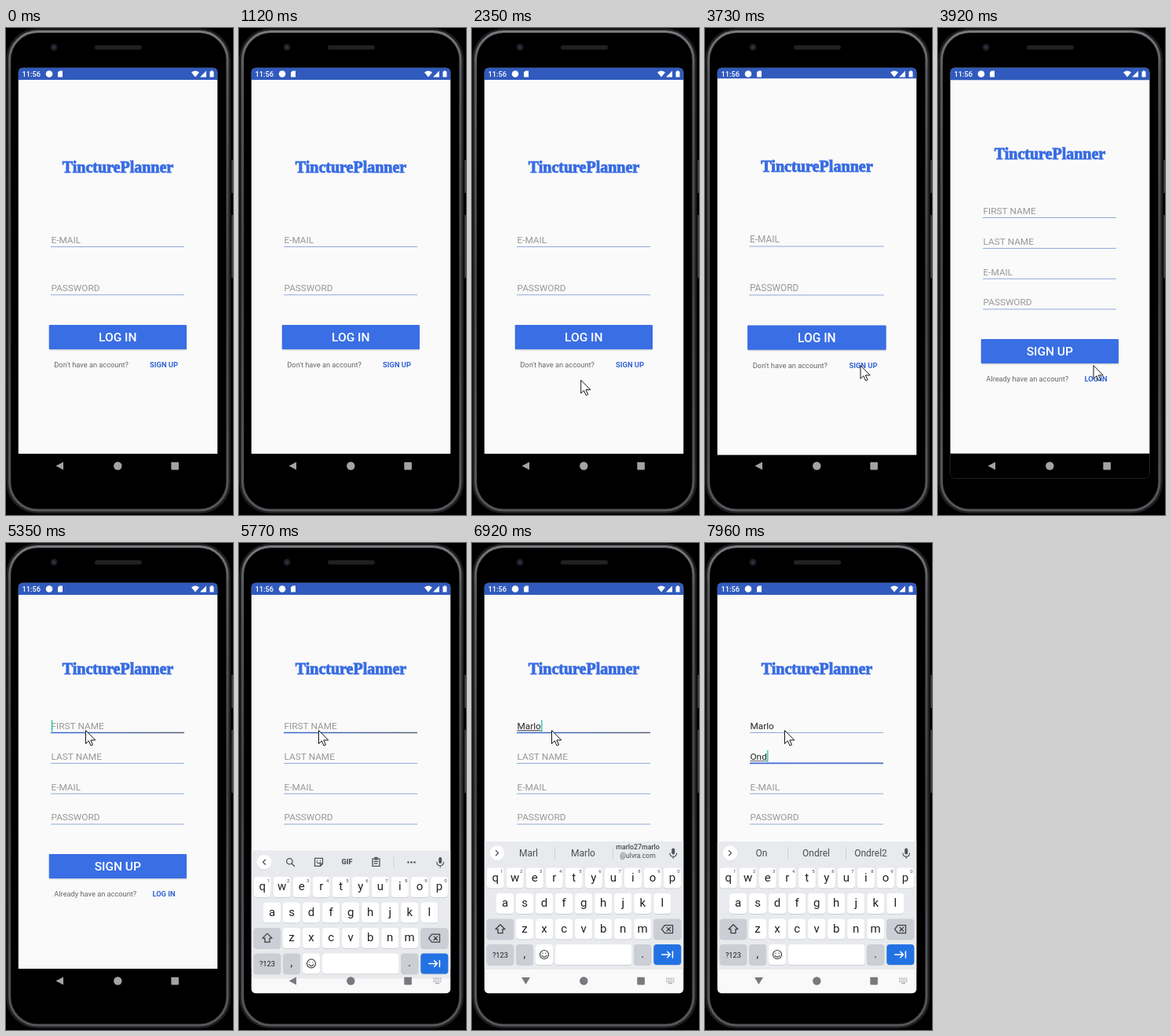
These frames come from a looping animation (289 by 620 pixels, 8 s). An HTML page with a canvas:

```html
<!DOCTYPE html>
<html lang="en">
<head>
<meta charset="utf-8">
<title>Phone sign-up demo</title>
<style>
  html, body { margin: 0; width: 100%; height: 100%; overflow: hidden; background: #000; }
  canvas { display: block; width: 289px; height: 620px; }
</style>
</head>
<body>
<canvas id="stage"></canvas>
<script>
const W = 289, H = 620, LOOP = 8000;
const canvas = document.getElementById('stage');
const ratio = window.devicePixelRatio || 1;
canvas.width = W * ratio;
canvas.height = H * ratio;
const ctx = canvas.getContext('2d');

const BLUE = '#386ce2', KEY_TEXT = '#202124', ICON = '#50545a';
const SANS = 'Roboto, sans-serif', SERIF = '"Liberation Serif", serif';
const APP = 'TincturePlanner';
const SWITCH = 3698, FOCUS = 5240, KEYBOARD = 5600, TAB = 7180;

const firstName = { text: 'Marlo', times: [6020, 6210, 6390, 6550, 6720], extra: ['marlo27marlo', '@ulvra.com'] };
const lastName = { text: 'Ondrel', times: [7470, 7700, 7900], extra: ['Ondrel2'] };

const login = {
  title: 184, fields: [['E-MAIL', 273.6], ['PASSWORD', 335]],
  button: 'LOG IN', buttonY: 378, question: "Don't have an account?", link: 'SIGN UP', linkX: 201
};
const signup = {
  title: 166.5, fields: [['FIRST NAME', 236.7], ['LAST NAME', 275.6], ['E-MAIL', 314.5], ['PASSWORD', 353.2]],
  button: 'SIGN UP', buttonY: 396, question: 'Already have an account?', link: 'LOG IN', linkX: 201
};

// Pointer tip: time, x, y
const pointerPath = [
  [2210, 147, 512], [2350, 138.7, 448.6], [2460, 138, 443], [3100, 141, 441],
  [3480, 198, 430], [4160, 198, 430], [4520, 143, 293.5], [4680, 143, 293.5], [5120, 101.5, 239]
];

const clamp = v => Math.max(0, Math.min(1, v));
const countTyped = (entry, t) => entry.times.filter(time => time <= t).length;

function rect(x, y, w, h, color, radius = 0) {
  ctx.fillStyle = color;
  ctx.beginPath();
  ctx.roundRect(x, y, w, h, radius);
  ctx.fill();
}

function ring(x, y, w, h, radius, color, width = 1) {
  ctx.strokeStyle = color;
  ctx.lineWidth = width;
  ctx.beginPath();
  ctx.roundRect(x, y, w, h, radius);
  ctx.stroke();
}

function disc(x, y, r, color) {
  ctx.fillStyle = color;
  ctx.beginPath();
  ctx.arc(x, y, r, 0, Math.PI * 2);
  ctx.fill();
}

function text(str, x, y, size, color, { weight = 400, align = 'left', family = SANS } = {}) {
  ctx.font = `${weight} ${size}px ${family}`;
  ctx.textAlign = align;
  ctx.fillStyle = color;
  ctx.fillText(str, x, y);
}

// Path in coordinates relative to (x, y), filled or outlined
function shape(path, x, y, { fill, stroke, width = 1.3 } = {}) {
  const p = new Path2D(path);
  ctx.save();
  ctx.translate(x, y);
  ctx.lineJoin = ctx.lineCap = 'round';
  if (fill) { ctx.fillStyle = fill; ctx.fill(p); }
  if (stroke) { ctx.strokeStyle = stroke; ctx.lineWidth = width; ctx.stroke(p); }
  ctx.restore();
}

function drawPhone() {
  rect(0, 0, W, H, '#000');
  rect(0.5, 0.5, 285.5, 617.5, '#1d1e20', 39);
  const metal = ctx.createLinearGradient(0, 0, 0, H);
  metal.addColorStop(0, '#7b7d80');
  metal.addColorStop(0.09, '#55575a');
  metal.addColorStop(0.5, '#3f4143');
  metal.addColorStop(1, '#55575a');
  ring(4.5, 4.5, 277.5, 609.5, 36, metal, 3);
  rect(6.5, 6.5, 273.5, 605.5, '#000', 34);
  rect(287, 168, 2, 42, '#3b3d40');
  rect(287, 238, 2, 80, '#3b3d40');
  rect(113, 22, 60, 5.5, '#202123', 2.7);
  disc(61, 24.5, 4.5, '#191b1f');
  disc(61, 24.5, 2.2, '#2c3344');
}

function drawStatus() {
  text('11:56', 20.5, 62, 9.3, '#fff', { weight: 500 });
  disc(55, 58.5, 4.3, '#fff');
  shape('M-1 -4H3V4H-3V-2Z', 69, 58.5, { fill: '#fff' });
  shape('M0 4L-5 -2Q0 -6 5 -2Z', 241, 58.5, { fill: '#fff' });
  shape('M4 -4V4H-4Z', 251, 58.5, { fill: '#fff' });
  shape('M-1 -4.3H1V-3.3H2.5V4H-2.5V-3.3H-1Z', 262, 58.5, { fill: '#fff' });
}

function drawField(label, y, entry, t, focus) {
  const lineY = y + 4.8;
  const typed = entry ? entry.text.slice(0, countTyped(entry, t)) : '';
  text(typed || label, 57.5, y, 11.8, typed ? '#252525' : '#979797');
  if (focus === null) {
    rect(57, lineY - 0.5, 170, 1, '#91a9da');
    return;
  }
  const gradient = ctx.createLinearGradient(57, 0, 227, 0);
  gradient.addColorStop(0, '#3869da');
  gradient.addColorStop(1, entry === firstName ? '#596274' : '#4a70c9');
  rect(57, lineY - 0.8, 170, 1.6, gradient);
  const width = typed ? ctx.measureText(typed).width : 0;
  if (typed) rect(57.5, y + 1.6, width, 0.9, '#333');
  const lastChange = Math.max(focus, ...entry.times.filter(time => time <= t));
  if ((t - lastChange) % 1000 < 500) rect(57.7 + width, y - 11.5, 1.5, 15, '#35cdb0');
}

function drawPage(page, t) {
  rect(15, 49, 255, 493, '#fafafa');
  rect(15, 49, 255, 17, '#305abd');
  rect(15, 542, 255, 60, '#000');

  text(APP, 142.5, page.title, 20, BLUE, { weight: 700, align: 'center', family: SERIF });
  ctx.strokeStyle = BLUE;
  ctx.lineWidth = 0.9;
  ctx.strokeText(APP, 142.5, page.title);

  page.fields.forEach(([label, y], i) => {
    const entry = page === signup ? [firstName, lastName][i] : null;
    const focused = entry && (i === 0 ? t >= FOCUS && t < TAB : t >= TAB);
    drawField(label, y, entry, t, focused ? (i === 0 ? FOCUS : TAB) : null);
  });

  const y = page.buttonY;
  rect(55, y + 1, 175, 31.5, '#d3d5da', 1);
  rect(54.7, y, 175.3, 31, '#396ee4', 1);
  text(page.button, 142.3, y + 21.3, 15.5, '#fff', { weight: 500, align: 'center' });
  text(page.question, 61.3, y + 54, 9.25, '#666');
  text(page.link, page.linkX, y + 54, 9.3, '#3263d8', { weight: 700, align: 'center' });
}

function drawScaled(page, t, scale, alpha) {
  ctx.save();
  ctx.globalAlpha = alpha;
  ctx.translate(143, 318);
  ctx.scale(scale, scale);
  ctx.translate(-143, -318);
  drawPage(page, t);
  ctx.restore();
}

function drawPages(t) {
  const elapsed = t - SWITCH, u = clamp(elapsed / 400);
  if (u === 0) return drawPage(login, t);
  if (u === 1) return drawPage(signup, t);
  const p = u < 1 / 6 ? 0.4 * (6 * u) ** 3 : 1 - 0.6 * (1.2 * (1 - u)) ** 8;
  drawScaled(login, t, 1 + 0.15 * p, 1);
  drawScaled(signup, t, 0.85 + 0.15 * p, clamp((elapsed - 35) / 50));
}

function key(x, y, w, color = '#fff') {
  rect(x, y + 0.8, w, 26, '#c3c6cb', 4);
  rect(x, y, w, 26, color, 4);
}

function drawLetters(letters, startX, y, digits = '') {
  [...letters].forEach((letter, i) => {
    const x = startX + i * 25.03;
    key(x - 11, y, 22);
    text(letter, x, y + 17.2, 15, KEY_TEXT, { align: 'center' });
    if (digits) text(digits[i], x + 8, y + 6.8, 6, '#44474b', { align: 'center' });
  });
}

function drawToolbar() {
  const line = { stroke: ICON };
  shape('M1.6 1.6L5 5M2.5 -1.2A3.7 3.7 0 1 1 -4.9 -1.2A3.7 3.7 0 1 1 2.5 -1.2', 65.5, 395, line);
  shape('M-5 -5H5V2L2 5H-5ZM2 5V2H5M-2.5 0Q0 3 2.5 0M-2 -2.2V-2M2 -2.2V-2', 101.5, 395, line);
  text('GIF', 137.5, 398, 9, ICON, { weight: 900, align: 'center' });
  shape('M-4.5 -4H4.5V5.5H-4.5ZM-1.5 -5.5H1.5V-3H-1.5ZM-2.3 -0.5H2.3M-2.3 2H1.5', 174.5, 394.5, line);
  rect(196.7, 388, 0.8, 14, '#c8cbd0');
  [-4, 0, 4].forEach(dx => disc(219.5 + dx, 395, 1.3, ICON));
}

function drawSuggestions(entry, count) {
  const options = { align: 'center' }, color = '#4a4d52';
  text(entry.text.slice(0, Math.max(1, count - 1)), 72, 399.3, 12, color, options);
  text(entry.text, 141.5, 399.3, 12, color, options);
  if (entry.extra.length === 1) {
    text(entry.extra[0], 211, 399.3, 12, color, options);
  } else {
    text(entry.extra[0], 211, 390.3, 8.8, color, { weight: 500, align: 'center' });
    text(entry.extra[1], 211, 401.3, 8.6, color, options);
  }
  rect(105, 387, 0.8, 15, '#c8cbd0');
  rect(179, 387, 0.8, 15, '#c8cbd0');
}

function drawKeyboard(t) {
  if (t < KEYBOARD) return;
  ctx.save();
  ctx.translate(0, 194 * (1 - clamp((t - KEYBOARD) / 280)) ** 3);
  rect(15, 380, 255, 164, '#e8eaed');
  rect(15, 543, 255, 50, '#f9f9fa');

  const entry = t < TAB ? firstName : lastName;
  const count = countTyped(entry, t);
  disc(32, 395.4, 9.8, '#d2d5d9');
  disc(32, 394.8, 9.6, '#fff');
  shape(count ? 'M-1.5 -3L1.5 0L-1.5 3' : 'M1.5 -3L-1.5 0L1.5 3', 32, 394.8, { stroke: ICON });
  if (count) drawSuggestions(entry, count);
  else drawToolbar();
  rect(254.2, 388.5, 4, 8, ICON, 2);
  shape('M-4.3 0Q-4 4.3 0 4.3Q4 4.3 4.3 0M0 4.3V6.5', 256.2, 395, { stroke: ICON, width: 1.2 });

  drawLetters('qwertyuiop', 29.7, 413.5, '1234567890');
  drawLetters('asdfghjkl', 42, 446);
  drawLetters('zxcvbnm', 67, 478.5);

  const dark = '#cbced5';
  key(18.7, 478.5, 34.5, dark);
  shape('M0 -6L6 0H3V5H-3V0H-6Z', 36, 491.7, { stroke: '#3c4043' });
  key(231.3, 478.5, 35, dark);
  shape('M-7 0L-3 -5H7V5H-3ZM-0.5 -2.3L4.1 2.3M4.1 -2.3L-0.5 2.3', 248.5, 491.7, { stroke: '#3c4043' });

  key(18.7, 511, 34.5, dark);
  text('?123', 36, 527.5, 9.3, KEY_TEXT, { align: 'center' });
  key(56, 511, 22, dark);
  text(',', 67, 528, 14, KEY_TEXT, { align: 'center' });
  key(81, 511, 22);
  shape('M5.5 0A5.5 5.5 0 1 1 -5.5 0A5.5 5.5 0 1 1 5.5 0M-3 1.3Q0 5 3 1.3M-2 -1.8V-1.6M2 -1.8V-1.6', 92, 524, { stroke: '#3c4043', width: 1.2 });
  key(106, 511, 97.5);
  key(206.2, 511, 22, dark);
  text('.', 217.2, 528, 14, KEY_TEXT, { align: 'center' });
  key(231.3, 511, 35, '#2372e3');
  shape('M-7 0H3.5M0 -3.7L3.7 0L0 3.7M6.7 -4V4', 248.7, 524, { stroke: '#fff', width: 1.5 });
  ctx.restore();
}

function drawNavigation(t) {
  const keyboardUp = t >= KEYBOARD + 130;
  const color = keyboardUp ? '#77797c' : '#a3a3a3';
  const down = t >= KEYBOARD + 230;
  shape(down ? 'M-5.5 -4.5H5.5L0 4.5Z' : 'M4.5 -5V5L-5 0Z', 68.5, 557.5, { fill: color });
  disc(142.3, 557.5, 5.2, color);
  rect(210.3, 552.8, 9.6, 9.6, color, 0.8);
  if (!keyboardUp) return;
  for (let row = 0; row < 3; row++) {
    for (let col = 0; col < 5; col++) rect(247.2 + col * 2.2, 553.8 + row * 2.1, 1.3, 1.2, '#92959a');
  }
  rect(250, 560.3, 5, 1, '#92959a');
}

function drawPointer(t) {
  if (t < pointerPath[0][0]) return;
  const next = pointerPath.findIndex(point => point[0] > t);
  let [, x, y] = pointerPath[pointerPath.length - 1];
  if (next > 0) {
    const [t0, x0, y0] = pointerPath[next - 1], [t1, x1, y1] = pointerPath[next];
    const u = (t - t0) / (t1 - t0), eased = u * u * (3 - 2 * u);
    x = x0 + (x1 - x0) * eased;
    y = y0 + (y1 - y0) * eased;
  }
  shape('M0 0V16.5L3.8 12.9L6.5 19L9 17.9L6.3 12H11.8Z', x, y, { fill: '#fff', stroke: '#151515', width: 1 });
}

function draw(t) {
  ctx.setTransform(ratio, 0, 0, ratio, 0, 0);
  drawPhone();
  ctx.save();
  ctx.beginPath();
  ctx.roundRect(15.5, 50.5, 254, 523, 6);
  ctx.clip();
  drawPages(t);
  drawStatus();
  drawKeyboard(t);
  drawNavigation(t);
  ctx.restore();
  // Hides the fringe left along the clipped screen edge
  ring(15, 50, 255, 524, 6.5, '#000');
  drawPointer(t);
}

function tick() {
  draw(performance.now() % LOOP);
  requestAnimationFrame(tick);
}
tick();
</script>
</body>
</html>
```
